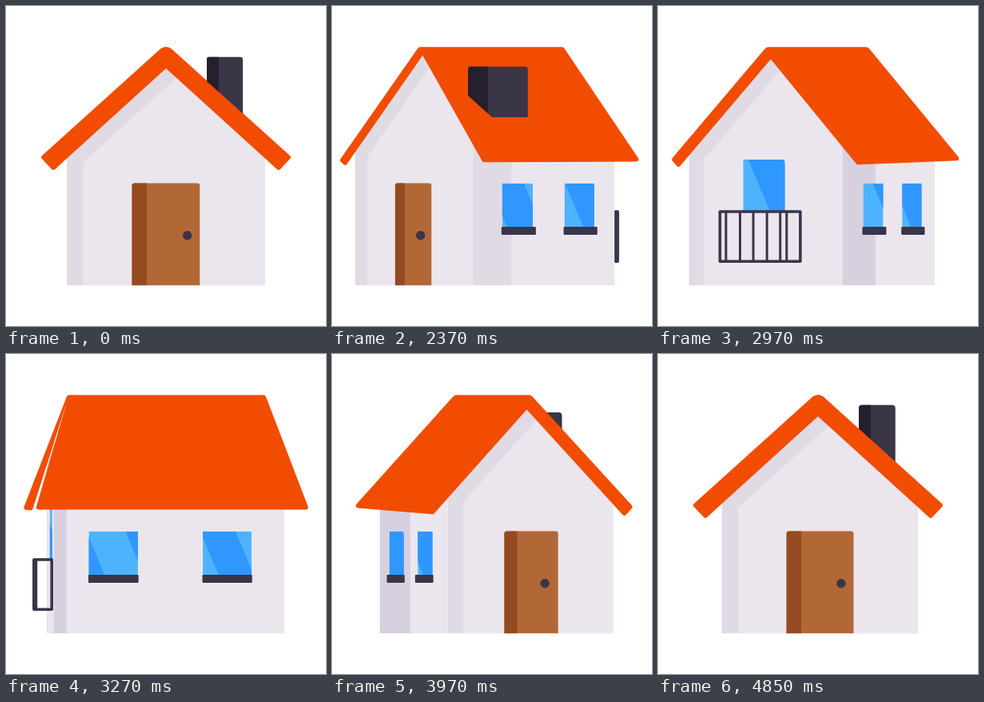
Recreate the animation shown at these times as an HTML page with a canvas. Size 400x400 px, loop 4.87 s.

```html
<!DOCTYPE html>
<html lang="en">
<head>
<meta charset="utf-8">
<title>Turning house</title>
<style>
html, body { margin: 0; width: 100%; height: 100%; overflow: hidden; background: #fff; }
canvas { display: block; width: 100vmin; height: 100vmin; }
</style>
</head>
<body>
<canvas id="stage"></canvas>
<script>
const canvas = document.getElementById('stage');
const ctx = canvas.getContext('2d');
const scale = Math.max(1, window.devicePixelRatio || 1);
canvas.width = canvas.height = 400 * scale;

const LOOP = 4870, HOLD = 2020, GROUND = 349.5;
const ROOF = '#f24c00', WALL = '#ebe6ed', SHADE = '#e0dae4', DEEP = '#d7d0df';
const DARK = '#3a3547', BLACK = '#25202c', DOOR = '#b26836', DOOR_DARK = '#964a22';
const SKY = '#4db3ff', BLUE = '#2f97ff';

// Turn over time, in eighths of a revolution
const TURN = [
  [2000, 0], [2020, .006], [2150, .163], [2300, .735], [2458, 1.73], [2700, 3.38],
  [3100, 5.3], [3270, 5.942], [3650, 6.955], [3950, 7.43], [4180, 7.69],
  [4320, 7.822], [4600, 7.94], [4850, 7.973], [4900, 7.976]
];
const slopes = TURN.slice(1).map((b, i) => (b[1] - TURN[i][1]) / (b[0] - TURN[i][0]));
const tangents = TURN.map((_, i) => {
  const a = slopes[i - 1], b = slopes[i];
  return a > 0 && b > 0 ? 2 * a * b / (a + b) : 0;
});

function turnAt(t) {
  if (t < HOLD) return 0;
  let i = 0;
  while (i < TURN.length - 2 && t >= TURN[i + 1][0]) i++;
  const [t0, a] = TURN[i], [t1, b] = TURN[i + 1];
  const h = t1 - t0, s = (t - t0) / h, s2 = s * s, s3 = s2 * s;
  return a * (2 * s3 - 3 * s2 + 1) + b * (3 * s2 - 2 * s3) +
    h * (tangents[i] * (s3 - 2 * s2 + s) + tangents[i + 1] * (s3 - s2));
}

const lerp = (a, b, k) => a + (b - a) * k;

// Value along the three key views: gable, corner, long side
const blend = (u, a, b, c) => u < 1 ? lerp(a, b, u) : lerp(b, c, u - 1);

function poly(points) {
  ctx.beginPath();
  points.forEach(([x, y]) => ctx.lineTo(x, y));
  ctx.closePath();
}

function fillPoly(points, color) {
  ctx.fillStyle = color;
  poly(points);
  ctx.fill();
}

// Points are [x, y, corner radius]
function fillRounded(points, color) {
  const last = points[points.length - 1], first = points[0];
  ctx.fillStyle = color;
  ctx.beginPath();
  ctx.moveTo((last[0] + first[0]) / 2, (last[1] + first[1]) / 2);
  points.forEach((p, i) => {
    const n = points[(i + 1) % points.length];
    if (p[2]) ctx.arcTo(p[0], p[1], n[0], n[1], p[2]);
    else ctx.lineTo(p[0], p[1]);
  });
  ctx.closePath();
  ctx.fill();
}

function box(x0, y0, x1, y1, color, radii = 0) {
  if (x1 - x0 < .05) return;
  ctx.fillStyle = color;
  ctx.beginPath();
  ctx.roundRect(x0, y0, x1 - x0, y1 - y0, radii);
  ctx.fill();
}

function clipped(path, draw) {
  ctx.save();
  path();
  ctx.clip();
  draw();
  ctx.restore();
}

// Glass pane with sliding diagonal reflections
function pane(x0, y0, x1, y1, shift) {
  const band = 44, period = 93, lean = .42 * (y1 - y0);
  if (x1 - x0 < .3) return;
  clipped(() => { ctx.beginPath(); ctx.rect(x0, y0, x1 - x0, y1 - y0); }, () => {
    box(x0, y0, x1, y1, SKY);
    const start = x0 + ((shift % period) + period) % period - 2 * period;
    for (let a = start; a < x1; a += period) {
      fillPoly([[a, y0], [a + band, y0], [a + band + lean, y1], [a + lean, y1]], BLUE);
    }
  });
}

function rail(a, b, place, mirror) {
  const w = b - a - 4;
  ctx.strokeStyle = DARK;
  ctx.lineJoin = 'round';
  ctx.lineWidth = 3.6;
  ctx.strokeRect(a + 2, 257, Math.max(.5, w), 62.2);
  ctx.lineWidth = 3;
  ctx.beginPath();
  for (let i = 1; i < 7; i++) {
    const k = place(i);
    const x = a + 2 + w * (mirror ? 1 - k : k);
    ctx.moveTo(x, 257);
    ctx.lineTo(x, 319);
  }
  ctx.stroke();
}

function draw(t) {
  const p = turnAt(t);
  const quarter = Math.min(3, Math.floor(p / 2));
  const flip = quarter % 2 === 0;
  const back = quarter === 1 || quarter === 2;
  const chimneySide = quarter < 2;
  // 0: gable faces us, 1: corner view, 2: long side faces us
  const u = flip ? p - quarter * 2 : quarter * 2 + 2 - p;
  // The long side and the roof depth only show once clearly turned
  const depth = u < .03 ? 0 : u;
  const key = (a, b, c) => blend(u, a, b, c);
  const roofKey = (a, b, c) => blend(depth, a, b, c);
  const mx = x => flip ? 400 - x : x;
  const pt = (x, y, r) => [mx(x), y, r];
  const span = (a, b) => flip ? [400 - b, 400 - a] : [a, b];

  ctx.setTransform(scale, 0, 0, scale, 0, 0);
  ctx.fillStyle = '#fff';
  ctx.fillRect(0, 0, 400, 400);

  const edge = key(76, 203, 348);
  const left = depth ? key(76, 45.5, 52.4) : edge;
  const right = key(324, 375, 348);
  const apex = [roofKey(200, 280, 326), roofKey(78, 62.5, 58)];
  const foot = [roofKey(59, 184, 373.5), roofKey(206, 195.5, 194.5)];
  const tip = [roofKey(341, 386, 366), roofKey(206, 201, 195)];

  if (!chimneySide && u < 1) {
    const [a, b] = span(251 - 24 * depth, 296.7 - 17 * depth);
    const top = 63.7 + 17 * depth;
    box(a, top, b, 140, DARK, [4, 4, 0, 0]);
    box(a, top, a + 15, 140, BLACK, [4, 0, 0, 0]);
  }

  if (!back && u > .8) {
    const a = u < 1 ? 42.5 + 60 * (1 - u) : lerp(42.5, 32, u - 1);
    const b = u < 1 ? a + 4 : lerp(46.5, 54, u - 1);
    rail(...span(a, b), i => i * .02, flip);
  }

  // Walls
  const [wallA, wallB] = span(left, right);
  const onLine = (x, end) => lerp(apex[1], end[1], (x - apex[0]) / (end[0] - apex[0])) - 4;
  clipped(() => {
    ctx.beginPath();
    ctx.roundRect(wallA, 0, wallB - wallA, GROUND, [0, 0, 3, 3]);
  }, () => {
    const [sa, sb] = span(left, edge);
    if (sb - sa > .1) {
      const under = Math.max(left, Math.min(foot[0] - 4, edge));
      const side = [
        pt(left, GROUND), pt(left, 188), pt(under, 188),
        pt(edge, Math.min(188, onLine(edge, foot))), pt(edge, GROUND)
      ];
      clipped(() => poly(side), () => {
        box(sa, 0, sb, GROUND, WALL);
        const band = chimneySide ? key(44, 54, 14) : key(30, 45.5, 14);
        box(sa, 0, Math.min(sb, sa + band), GROUND, chimneySide ? SHADE : DEEP);
      });
    }
    const gable = [
      pt(edge, GROUND), pt(edge, onLine(edge, foot)), pt(apex[0], apex[1] - 4),
      pt(right, onLine(right, tip)), pt(right, GROUND)
    ];
    clipped(() => poly(gable), () => {
      fillPoly(gable, SHADE);
      const dx = key(20.5, 18, 0);
      fillPoly(gable.map(([x, y]) => [x + dx, y + 9]), WALL);
      if (!back) door();
    });
  });

  function door() {
    const [a, b] = span(key(157.8, 264, 345), key(242.5, 316.5, 348));
    const w = b - a;
    if (w < 1) return;
    const r = Math.min(3, w / 4);
    box(a, 221.5, b, GROUND, DOOR, [r, r, 0, 0]);
    box(a, 221.5, a + Math.min(w, key(18.5, 13.8, 1)), GROUND, DOOR_DARK, [r, 0, 0, 0]);
    ctx.fillStyle = DARK;
    ctx.beginPath();
    ctx.ellipse(a + w * key(.817, .7, .7), 286.7, 5.7 * Math.min(1, w / 25), 5.7, 0, 0, 7);
    ctx.fill();
  }

  // Long side windows
  const turned = p - 5.942;
  const shifts = chimneySide ? [27 - 49 * turned, 37 - 70 * turned] : [46 - 49 * turned, -3 - 70 * turned];
  const panes = [
    [key(76, 68.5, 94.5), key(76, 101.5, 157)],
    [key(76, 133.5, 241), key(76, 167.5, 304)]
  ];
  if (depth) {
    (flip ? panes.reverse() : panes).forEach(([x0, x1], i) => {
      const [a, b] = span(x0, x1);
      pane(a, 221.7, b, 277, shifts[i]);
      const [c, d] = span(x0 - key(2, 4.5, .5), x1 + key(1, 1, .5));
      box(c, 276, d, 286, DARK, 1);
    });
  }

  if (back) {
    const [a, b] = span(key(166.5, 268, 346.5), key(233.5, 315, 347));
    pane(a, 192, b, 256, -20 - 49 * (p - 3.38));
    const view = [0, .17, .25, .415, .585, .75, .925, 1];
    rail(...span(key(133, 251, 346), key(267, 345, 368.4)), i => u < 1
      ? lerp(i / 7, view[i], Math.min(1, u / .618))
      : lerp(view[i], .9 + i / 70, u - 1), flip);
  }

  // Roof
  const ridge = roofKey(10, 4, 3);
  fillRounded([
    pt(roofKey(43, 13, 21.5), roofKey(189, 194.5, 194.5), 2.8),
    pt(roofKey(196, 117, 73.5), roofKey(51, 51.3, 51.3), ridge),
    pt(roofKey(204, 286, 325.5), roofKey(51, 51.3, 51.3), ridge),
    pt(roofKey(357, 393, 378), roofKey(189, 193, 194.5), 2.8),
    pt(tip[0], tip[1], 2.8),
    pt(apex[0], apex[1], 0),
    pt(foot[0], foot[1], 2.8)
  ], ROOF);

  if (chimneySide) chimney();

  function chimney() {
    const near = flip ? key(104, 186, 282) : key(104, 141, 187);
    const far = flip ? key(104, 146, 210) : key(104, 97.5, 114);
    const inner = near + key(45, 35, 0);
    const top = key(63.7, 75.5, 78);
    const base = key(134.5, 138.5, 142);
    const rise = key(94, 107, 142);
    const outline = [pt(far, top, 3), pt(inner, top, 3), pt(inner, rise, 1), pt(near, base, 0), pt(far, base, 1)];
    fillRounded(near - far < .5 ? outline.slice(0, 4) : outline, DARK);
    const [a, b] = span(near, inner);
    const cut = a + (b - a) * key(.33, .79, 1);
    const baseAt = x => lerp(base, rise, (mx(x) - near) / (inner - near || 1));
    if (b - a > .2) {
      fillRounded([
        [a, top, flip ? 3 : 0], [cut, top, 0], [cut, baseAt(cut), 0], [a, baseAt(a), 0]
      ], BLACK);
    }
  }
}

function tick() {
  draw(performance.now() % LOOP);
  requestAnimationFrame(tick);
}
tick();
</script>
</body>
</html>
```
